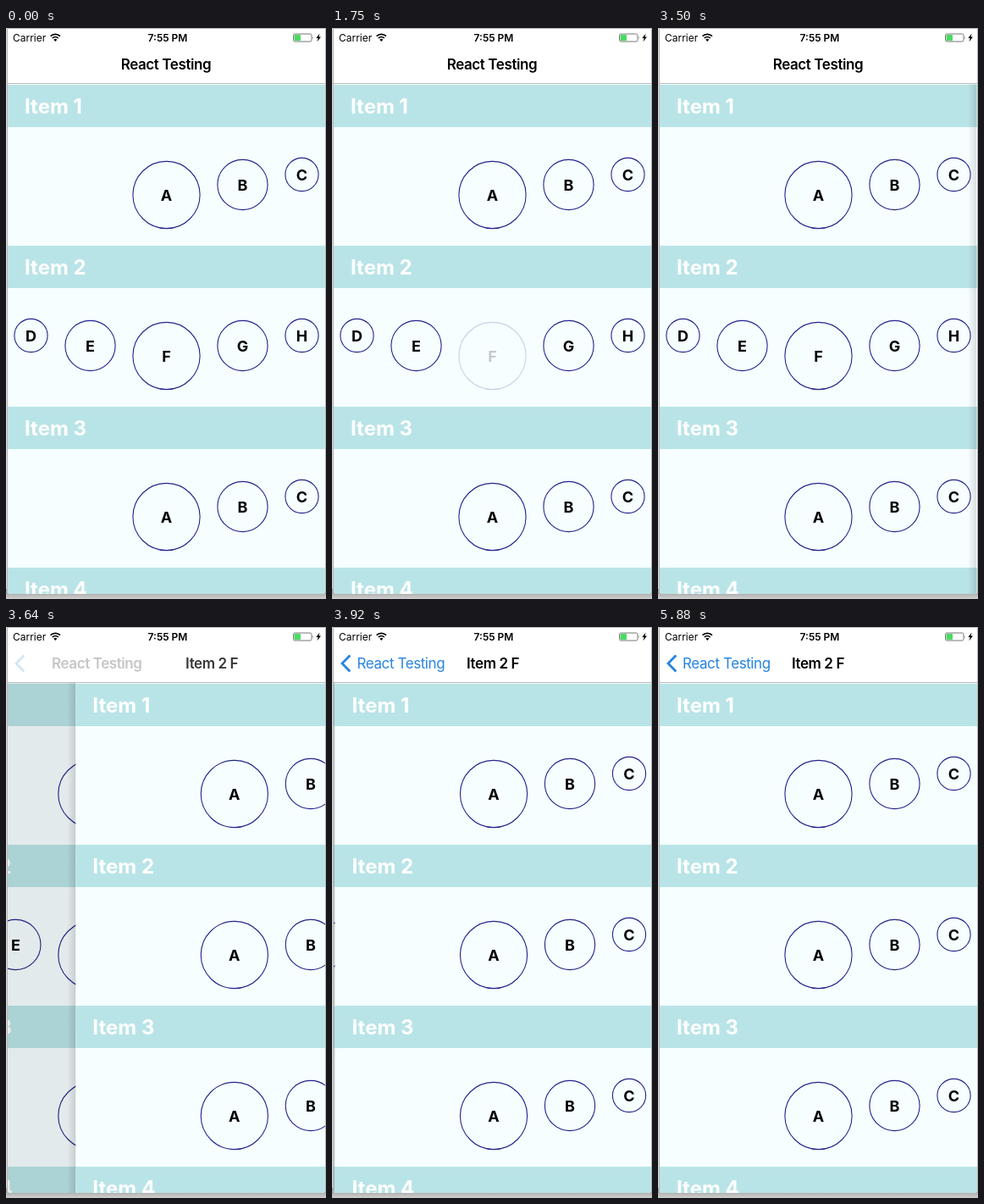
Animation, 378 px wide and 674 px high, one loop 5950 ms. Source, as an HTML page:

```html
<!DOCTYPE html>
<html lang="en">
<head>
<meta charset="utf-8">
<title>Navigation push</title>
<style>
  html, body { margin: 0; width: 100%; height: 100%; overflow: hidden; background: #fff; }
  svg { display: block; width: 378px; height: 674px; font-family: Inter, "Liberation Sans", sans-serif; }
  .mid { text-anchor: middle; }
  .status { font-size: 12px; }
  .nav { font-size: 17px; letter-spacing: -.41px; }
  .strong { font-weight: 600; }
  .blue { fill: #2484e0; }
  .head { font-size: 24px; font-weight: 700; fill: #fff; }
  .letter { font-size: 18px; font-weight: 700; text-anchor: middle; }
  .ring { fill: none; stroke: #24248c; stroke-width: 1.1; }
</style>
</head>
<body>
<svg viewBox="0 0 378 674">
  <defs>
    <clipPath id="screen"><path d="M2 1H377V664a4 4 0 0 1-4 4H6a4 4 0 0 1-4-4Z"/></clipPath>
    <linearGradient id="floor" x2="0" y2="1">
      <stop stop-color="#969696"/><stop offset="1" stop-color="#cfcfcf"/>
    </linearGradient>
    <linearGradient id="edge">
      <stop stop-opacity="0"/><stop offset="1" stop-opacity=".12"/>
    </linearGradient>
  </defs>

  <rect width="378" height="674" fill="#dcdcdc"/>
  <rect y="662" width="378" height="12" fill="url(#floor)"/>
  <path d="M1.5 .5H377.5V664a4.5 4.5 0 0 1-4.5 4.5H6a4.5 4.5 0 0 1-4.5-4.5Z" fill="#fff" stroke="#b4b4b4"/>

  <g clip-path="url(#screen)">
    <g id="back"></g>
    <rect id="dim" x="2" y="66" width="375" height="602"/>
    <g id="front">
      <rect x="-8" y="66" width="10" height="602" fill="url(#edge)"/>
    </g>

    <rect x="2" y="1" width="375" height="65" fill="#fff"/>
    <rect x="2" y="65" width="375" height="1" fill="#b8bcbd"/>

    <text class="status" x="8" y="16">Carrier</text>
    <g fill="none" stroke="#000" stroke-width="1.7">
      <path d="M52.6 9.6a8.2 8.2 0 0 1 11.4 0M54.8 12a5 5 0 0 1 7 0"/>
    </g>
    <path d="M58.3 16l-2-2.2a2.9 2.9 0 0 1 4 0Z"/>
    <text class="status strong mid" x="191" y="16">7:55 PM</text>
    <rect x="339.5" y="7" width="21.5" height="9" rx="1.8" fill="#fff" stroke="#777"/>
    <rect x="340.5" y="8" width="7.5" height="7" rx=".8" fill="#4cd964"/>
    <path d="M362 10q1.6 1.5 0 3Z" fill="#777"/>
    <path d="M370.6 6.5L366.3 12h2.4l-1.2 4.2 4.5-5.6h-2.5Z"/>

    <path id="chevron" d="M21.3 33.5L12 43l9.3 9.5" fill="none" stroke="#2484e0" stroke-width="2.8"/>
    <text id="label" class="nav blue" x="29" y="49">React Testing</text>
    <text id="oldTitle" class="nav strong mid" x="189" y="49">React Testing</text>
    <text id="newTitle" class="nav strong mid" x="189" y="49">Item 2 F</text>
  </g>
</svg>
<script>
const LOOP = 5950, TICK = 70, WIDTH = 374;
const PUSH = 3500, PUSH_ORIGIN = 3469.5, RATE = 17;
const $ = id => document.getElementById(id);
const clamp = v => Math.min(1, Math.max(0, v));

// Slot 0..4 runs left to right; circles shrink away from the middle.
function bubble(letter, slot, top) {
  const x = [29.5, 99.5, 189.5, 279.5, 349.5][slot];
  const far = Math.abs(slot - 2);
  const r = [40, 30, 20][far];
  const y = top + [80, 68, 56][far];
  const id = letter === 'F' ? ' id="pressed"' : '';
  return `<g${id}><circle class="ring" cx="${x}" cy="${y}" r="${r - .4}"/>` +
    `<text class="letter" x="${x}" y="${y + 7}">${letter}</text></g>`;
}

function section(letters, i) {
  const top = 67 + i * 190;
  const first = 5 - letters.length;
  return `<rect x="2" y="${top}" width="375" height="50" fill="#b9e4e7"/>` +
    `<text class="head" x="22" y="${top + 33.5}">Item ${i + 1}</text>` +
    [...letters].map((c, n) => bubble(c, first + n, top + 50)).join('');
}

function card(group, rows) {
  group.insertAdjacentHTML('beforeend',
    '<rect x="2" y="66" width="375" height="602" fill="#f6feff"/>' + rows.map(section).join(''));
}

card($('back'), ['ABC', 'DEFGH', 'ABC', '']);
card($('front'), ['ABC', 'ABC', 'ABC', '']);

function shift(el, x) { el.setAttribute('transform', `translate(${x.toFixed(2)} 0)`); }

function fade(t, start) {
  const k = clamp((t - start) / 245);
  return k * k * (3 - 2 * k);
}

// Critically damped spring from 0 to 1.
function push(t) {
  if (t <= PUSH) return 0;
  const x = RATE * (t - PUSH_ORIGIN) / 1000;
  return 1 - Math.exp(-x) * (1 + x);
}

function draw(time) {
  const t = Math.floor(time % LOOP / TICK) * TICK;
  const p = push(t), rest = 1 - p;

  $('pressed').setAttribute('opacity', 1 - .8 * (fade(t, 525) - fade(t, 3045)));
  shift($('back'), -.3 * WIDTH * p);
  $('dim').setAttribute('opacity', .1 * p);
  $('front').setAttribute('visibility', t >= PUSH ? 'visible' : 'hidden');
  shift($('front'), WIDTH * rest);

  shift($('oldTitle'), -104 * p);
  $('oldTitle').setAttribute('opacity', rest);
  shift($('newTitle'), 252 * rest);
  $('newTitle').setAttribute('opacity', p);
  shift($('label'), 121 * rest);
  $('label').setAttribute('opacity', clamp((p - .78) / .22));
  $('chevron').setAttribute('opacity', clamp((p - .73) / .27));
}

let start;
function frame(now) {
  start ??= now;
  draw(Math.max(0, now - start));
  requestAnimationFrame(frame);
}
draw(0);
requestAnimationFrame(frame);
</script>
</body>
</html>
```
